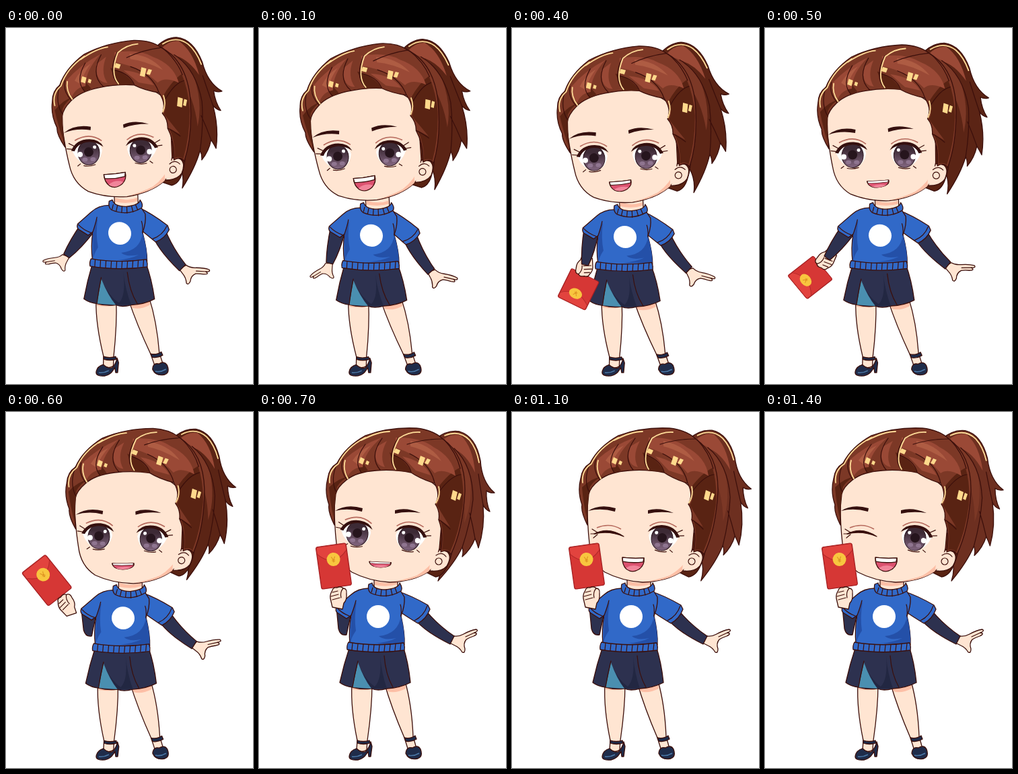
An HTML page that plays this animation: 367x529 px, repeating every 2000 ms.

```html
<!DOCTYPE html>
<html lang="en">
<head>
<meta charset="utf-8">
<title>Girl with a red packet</title>
<style>
html, body { margin: 0; width: 100%; height: 100%; overflow: hidden; background: #fff; }
svg { display: block; width: 100%; height: 100%; }
.ink { stroke: #3b0f0b; stroke-width: 1.3; stroke-linejoin: round; stroke-linecap: round; }
.line { fill: none; stroke: #3b0f0b; stroke-width: 1.2; stroke-linecap: round; stroke-linejoin: round; }
.skin { fill: #ffe5d2; }
.shade { fill: #fdbfa6; }
.blue { fill: #3169c8; }
.deep { fill: #2450a8; }
.navy { fill: #2d314f; }
.hair { fill: #7c3826; }
.dark { fill: #592313; }
.light { fill: #9a4936; }
.shine { fill: #ffd98c; }
.rim { fill: none; stroke: #ffdc98; stroke-width: 1.8; stroke-linecap: round; }
</style>
</head>
<body>
<svg viewBox="0 0 367 529">
<defs>
  <linearGradient id="irisFill" x2="0" y2="1">
    <stop offset=".25" stop-color="#3d2a35"/><stop offset="1" stop-color="#836781"/>
  </linearGradient>
  <g id="eye">
    <path fill="#fff" d="M-24-3Q-17-18 4-18Q18-15 20-3Q17 15 2 18Q-17 16-24-3Z"/>
    <ellipse rx="16" ry="18" fill="url(#irisFill)" stroke="#2a131b"/>
    <circle cy="-1" r="7" fill="#26151d"/>
    <ellipse cx="-6" cy="10" rx="4" ry="3" fill="#8f7590"/><ellipse cx="6" cy="10" rx="4" ry="3" fill="#8f7590"/>
    <circle cx="-13" cy="2" r="4" fill="#fff"/><circle cx="9" cy="-8" r="2.5" fill="#fff"/>
    <path fill="#35100f" d="M-26-4Q-18-21 2-20Q17-19 22-8Q11-16 0-16Q-16-15-21-3Z"/>
    <path class="line" stroke-width="1.6" d="M-20-10l-9-5M-23-6l-9-1M-8 19Q0 21 9 18M-13 16l-4 3"/>
    <path fill="none" stroke="#b5695c" stroke-width="1.6" d="M-20-19Q2-31 20-17"/>
  </g>
  <g id="openHand" class="ink skin">
    <path d="M-4 4L3-6Q10-5 17-9Q28-15 36-16Q40-14 33-11Q40-10 32-6Q26-4 21-1Q16 5 19 13Q19 20 15 18Q11 11 4 8Z"/>
    <path class="line" d="M20-5L33-11"/>
  </g>
  <g id="fist">
    <path class="ink skin" d="M-9 16L-12 3Q-13-3-9-9Q-8-14-2-13Q4-16 7-12Q13-12 12-4Q13 5 8 10L6 19Z"/>
    <path class="line" d="M-9-6L-1-8M-11 0L0-3M-9 5L2 2M7-12Q2-6 4 2"/>
  </g>
  <g id="packet">
    <rect class="ink" x="-22.5" y="-31.5" width="45" height="63" rx="3" fill="#d63735" style="stroke:#a51f22"/>
    <path fill="#e2433e" stroke="#b02828" d="M-22-21Q0 3 22-21V-29Q22-31 19-31H-19Q-22-31-22-29Z"/>
    <circle cx="1" cy="-10" r="10" fill="#f8c63f"/>
    <text x="1" y="-5.5" font-family="Noto Sans, sans-serif" font-size="12" fill="#d98a1e" text-anchor="middle">¥</text>
  </g>
</defs>

<g id="body">
  <!-- legs and shoes -->
  <g class="ink skin">
    <path d="M138 404Q136 440 146 488L145 502Q153 507 160 502L161 488Q168 440 168 404Z"/>
    <path d="M186 402Q197 440 216 484L221 500H234L229 482Q227 435 217 400Z"/>
  </g>
  <path class="shade" d="M139 408L167 411Q156 415 139 412ZM188 408L217 403L218 411Q202 419 191 415Z"/>
  <g class="ink" fill="#1f2c4a">
    <path d="M134 512Q135 503 145 500Q151 506 158 505Q164 499 166 490L168 497L166 512H163L162 504Q157 515 147 517Q134 518 134 512Z"/>
    <path d="M146 488Q155 491 164 488L165 492Q155 495 146 492Z"/>
    <path d="M218 507Q219 497 228 499Q236 494 240 501Q244 512 236 515Q222 518 218 507Z"/>
    <path d="M216 484Q225 486 232 481L234 486Q226 491 218 489Z"/>
  </g>
  <path d="M138 512Q146 513 153 509M222 510Q230 512 238 507" fill="none" stroke="#4b77a5" stroke-width="1.6"/>
  <!-- skirt -->
  <path class="ink navy" d="M135 348Q126 375 120 402Q128 408 139 409Q153 413 167 411Q176 415 190 411Q210 410 225 402Q222 372 214 348Z"/>
  <path fill="#4a8fb0" d="M147 372Q143 392 139 409L167 411Q156 397 147 372Z"/>
  <path fill="#222742" d="M147 372Q157 398 168 411L190 411Q182 388 180 362Q183 397 172 408Q157 398 147 372Z"/>
  <path class="line" d="M147 370Q142 390 139 409M186 362Q188 390 199 409"/>
  <!-- arms behind the shirt -->
  <path id="upArm" class="ink navy" d="M115 290L118 322Q121 333 130 331L136 303Z"/>
  <g id="armL">
    <g id="packetLow">
      <use href="#packet" transform="translate(-3 87) rotate(-165) scale(1 .78)"/>
      <use href="#fist" transform="translate(0 52) rotate(180)"/>
    </g>
    <g id="handL"><use href="#openHand" transform="translate(0 49) rotate(-72) scale(-.88 .88)"/></g>
    <path class="ink navy" d="M-11-6Q-10 25-5 48H5Q11 25 11-6Z"/>
  </g>
  <g id="sleeveR">
    <g id="foreR">
      <g id="handR"><use href="#openHand" x="287" y="339"/></g>
      <path class="ink navy" d="M228 303Q240 323 284 345L290 333Q266 317 246 293Z"/>
    </g>
    <path class="ink blue" d="M205 266Q225 272 251 287L254 293Q249 307 236 314L231 311Q218 303 208 296Z"/>
    <path class="line" d="M250 288Q245 303 231 310"/>
  </g>
  <!-- neck and shirt -->
  <path class="ink skin" d="M171 243V262Q188 270 206 260V243Z"/>
  <path class="shade" d="M172 251Q190 257 205 251V256Q190 261 172 257Z"/>
  <path class="ink blue" d="M163 262Q147 262 136 272L115 290Q113 295 116 298L130 307L137 302Q133 322 135 345Q173 356 216 346Q217 330 211 303Q217 288 216 275L208 262Q190 276 163 262Z"/>
  <path class="deep" d="M137 304Q141 286 145 282Q141 306 144 325Q137 335 136 343ZM211 303Q217 326 216 344H172Q192 342 204 336Q186 340 178 333Q207 330 211 303Z"/>
  <path class="line" d="M116 291Q123 299 134 303M137 302Q142 289 144 280M211 303Q212 292 210 286"/>
  <path class="ink blue" d="M163 256Q161 265 166 269Q189 279 211 266Q214 261 209 254Q208 262 188 264Q170 264 168 254Z"/>
  <path class="line" d="M169 261L167 268M175 263L173 271M182 264L181 273M189 264V274M196 263L198 272M202 261L205 269"/>
  <path class="ink blue" d="M133 342Q172 349 215 343Q217 349 216 354Q173 360 131 353Q130 347 133 342Z"/>
  <path id="ribs" class="line"/>
  <circle cx="177" cy="304" r="17" fill="#fff"/>
</g>

<g id="head">
  <g id="pony">
    <path id="ponyBase" class="ink" d="M262 40Q280 26 298 29Q322 36 329 72Q331 104 350 120Q343 121 338 117Q337 134 343 148Q336 145 333 138Q336 172 326 202Q324 195 321 188Q315 204 302 215Q304 207 302 201Q291 224 266 251Q273 233 268 215L262 100Z"/>
    <path class="light" d="M272 42Q286 31 300 35Q318 52 321 90Q308 62 288 54Z"/>
    <path class="hair" d="M274 45Q302 55 313 92Q319 132 305 165Q308 120 292 88Z"/>
    <path class="line" d="M290 54Q318 80 318 130Q314 165 302 201M326 92Q330 120 333 138M313 150Q318 170 321 188"/>
    <path class="rim" d="M276 35Q298 26 313 42Q323 54 327 75"/>
  </g>
  <path class="ink dark" d="M262 185L288 170Q291 205 281 226Q274 244 262 245L246 237Z"/>
  <path class="ink skin" d="M257 208Q270 202 280 208Q287 215 279 229Q271 238 254 236Z"/>
  <path class="ink skin" d="M112 110Q111 160 115 195Q117 223 138 238Q163 251 194 253Q230 252 252 237Q262 226 268 203L275 120L230 82H140Z"/>
  <path class="shade" d="M252 237Q262 226 266 211Q253 233 234 243Q215 250 194 252Q230 252 252 237Z"/>
  <path class="skin" d="M256 211L267 208L264 231L253 234Z"/>
  <circle class="line" cx="267" cy="222" r="5"/>
  <path class="line" d="M263 213Q272 207 278 215"/>
  <!-- front hair -->
  <path class="ink hair" d="M112 168Q102 148 104 138Q97 118 102 99Q104 83 116 76Q128 52 158 35Q194 22 234 24Q260 27 273 40Q307 64 306 118Q303 175 285 212Q281 203 270 208Q275 182 267 160Q269 147 262 137Q270 123 261 106Q239 99 226 90Q201 85 174 87Q145 89 130 101Q116 112 114 122Q111 145 112 168Z"/>
  <path class="dark" d="M266 112Q283 90 298 83Q305 107 303 137Q298 177 284 208Q281 203 272 205Q276 180 269 160L284 171Q273 153 264 138Q272 126 266 112ZM104 112Q106 137 112 161Q111 137 116 111Q122 101 134 96Q118 98 104 112ZM226 89Q216 69 194 60L202 87ZM150 61Q146 78 151 91L162 87Q153 75 150 61Z"/>
  <path class="light" d="M203 38Q240 37 259 52Q288 67 292 95Q272 83 261 91Q240 65 203 53ZM126 71Q151 49 182 38Q157 59 154 82Q140 82 132 95Q125 83 126 71ZM174 52L190 43Q178 65 187 82Q169 79 174 52ZM213 66Q245 73 255 94L233 87Z"/>
  <path fill="#ae5c43" d="M225 43Q256 49 271 73Q246 56 225 51ZM139 72Q149 57 166 50Q150 67 148 79Z"/>
  <path class="line" d="M114 118Q106 99 116 76M130 100Q119 84 125 70M152 90Q139 73 158 48M180 86Q163 66 183 39M202 85Q189 67 207 38M226 89Q221 72 200 64M261 106Q255 77 224 62M273 40Q245 40 220 48M267 160Q275 165 284 174M268 118Q285 95 300 93M275 41Q293 60 299 84"/>
  <path class="rim" d="M105 105Q103 87 118 77Q129 53 158 38M132 99Q124 85 128 72M203 85Q192 68 208 39Q223 29 239 30M152 42Q177 29 194 29M267 111Q270 123 263 135"/>
  <path class="shine" d="M151 67l6 3-3 8-6-3zM160 72l4 2-2 5-4-2zM203 54l7 3-3 6-7-3zM240 65l7 3-4 12-7-3zM250 69l5 2-4 7-5-2zM288 116l7 3-3 13-7-3zM297 120l4 2-3 9-4-2z"/>
  <!-- features -->
  <path fill="#35100f" d="M113 147Q130 136 154 143L153 148Q132 142 113 147ZM202 146Q219 141 240 150Q219 147 202 151Z"/>
  <g id="eyeL"><use href="#eye" transform="rotate(5)"/></g>
  <g id="wink">
    <path d="M122 181Q144 170 166 185Q145 176 122 181Z" fill="#35100f" class="ink"/>
    <path class="line" d="M127 179l-8-5M125 181l-8 0M127 182l-6 5"/>
    <path d="M126 172Q145 164 162 174" fill="none" stroke="#b5695c" stroke-width="1.5"/>
  </g>
  <use href="#eye" transform="translate(223 188) rotate(5) scale(-1 1)"/>
  <g id="mouth">
    <path class="ink" fill="#dc5270" d="M-16 0Q0 1 16-1Q18 9 10 16Q0 23-9 17Q-16 11-16 0Z"/>
    <path fill="#f0859a" d="M-10 15Q1 8 12 13Q2 23-8 17Z"/>
    <path class="ink" fill="#fff" d="M-16 0Q0 1 16-1L15 5Q0 8-15 6Z"/>
  </g>
</g>

<g id="upFront">
  <g id="upHand">
    <use href="#packet" transform="translate(111 229) rotate(-8)"/>
    <use href="#fist" x="118" y="274"/>
  </g>
</g>
</svg>
<script>
const $ = id => document.getElementById(id);
const move = (id, value) => $(id).setAttribute('transform', value);
const show = (id, on) => { $(id).style.display = on ? '' : 'none'; };

let ribs = '';
for (let x = 139; x < 214; x += 8) {
  const y = 343 + 3 * Math.sin((x - 133) / 82 * Math.PI);
  ribs += `M${x} ${y}l-1 10`;
}
$('ribs').setAttribute('d', ribs);

// step, head x, y, turn, body lean, drop, sleeve, forearm, hand, left arm, ponytail, mouth
const poses = [
  [0, -20.5, -3.3, -7.4, -8, 1, 8, 11, 9, 38, -3, 1],
  [1, -26, 1.5, -8.8, -10, 4, 11, 12, 15, 16, -4, 1],
  [3, -29, 7.5, -9.8, -12, 8, 13, 9, 34, -12, -7, 1],
  [5, -14, 3, -5.3, -6, 4, 4, 8, 12, 37, -4, .52],
  [7, 0, 0, 0, 0, 0, 0, 0, 0, 0, 0, .42],
  [9, 0, 0, 0, 0, 0, 0, 0, 0, 0, -5, 1],
  [11, 0, 0, 0, 0, 0, 0, 0, 0, 0, -4, 1],
  [14, 0, 0, 0, 0, 0, 0, 0, 0, 0, -3, 1]
];

function poseAt(step) {
  const i = Math.max(1, poses.findIndex(p => p[0] >= step));
  const a = poses[i - 1], b = poses[i];
  const k = (step - a[0]) / (b[0] - a[0]);
  return a.map((v, j) => v + (b[j] - v) * k);
}

function draw(ms) {
  const step = Math.min(14, Math.floor(ms % 2000 / 100));
  const [, hx, hy, turn, lean, drop, sleeve, fore, hand, armL, pony, mouth] = poseAt(step);

  // The body leans and sinks around the fixed feet.
  const kx = lean / 211, ky = drop / 195;
  const bodyMove = `matrix(1 0 ${-kx} ${1 - ky} ${515 * kx} ${515 * ky})`;
  move('body', bodyMove);
  move('upFront', bodyMove);
  move('head', `translate(${hx} ${hy}) rotate(${turn} 204 204.5)`);
  move('pony', `rotate(${pony} 272 40)`);
  $('ponyBase').setAttribute('fill', step < 7 ? '#5b2415' : '#6d2f20');

  move('sleeveR', `rotate(${sleeve} 212 272)`);
  move('foreR', `rotate(${fore} 243 304)`);
  move('handR', `rotate(${hand} 287 339)`);
  move('armL', `translate(126 300) rotate(${armL})`);
  move('upHand', `rotate(${step === 6 ? -30 : 0} 122 325)`);
  show('armL', step < 6);
  show('handL', step < 4);
  show('packetLow', step === 4 || step === 5);
  show('upArm', step > 5);
  show('upFront', step > 5);

  move('mouth', `translate(180 ${217 + (1 - mouth) * 10}) rotate(3) scale(1 ${mouth})`);
  move('eyeL', `translate(146 181) scale(1 ${step === 8 ? .5 : 1})`);
  show('eyeL', step < 9);
  show('wink', step > 8);
}

function tick() {
  draw(performance.now());
  requestAnimationFrame(tick);
}
tick();
</script>
</body>
</html>
```
